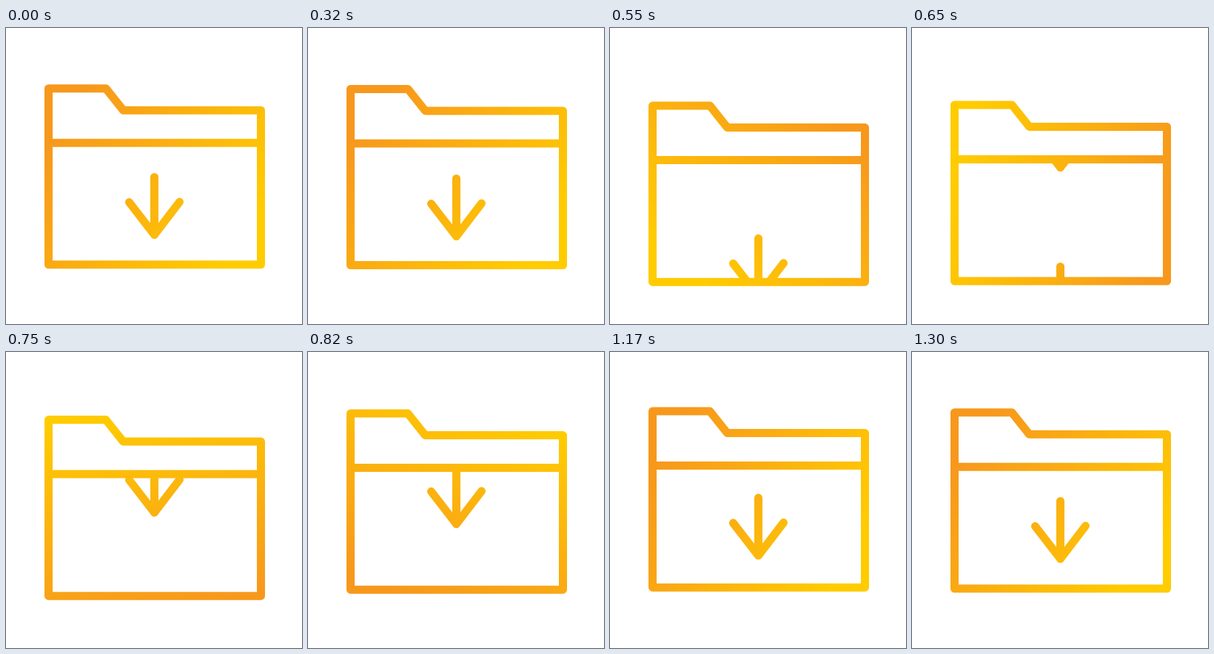
Write an HTML page with a canvas that moves like this. It is 400 by 400 pixels and loops after 1.32 s.

```html
<!DOCTYPE html>
<html lang="en">
<head>
<meta charset="utf-8">
<title>Folder download</title>
<style>
  html, body { margin: 0; height: 100%; overflow: hidden; background: #fff; }
  canvas { display: block; }
</style>
</head>
<body>
<canvas id="stage" width="400" height="400"></canvas>
<script>
const ctx = document.getElementById('stage').getContext('2d');
const LOOP = 1320, START = 320, END = 1300;
const TRAVEL = 212; // distance between the leaving and the entering arrow

// Motion curves as [time, value] points
const folderY = [[300, 0], [320, .7], [450, 17.5], [560, 23.6], [650, 22.2],
                 [820, 1.4], [940, -4.7], [1020, -4.5], [1300, 0]];
const arrowY = [[300, 0], [320, 2], [450, 43], [650, 121],
                [820, 165], [1020, 195], [1300, TRAVEL]];
const angle = [[300, 35], [320, 36], [450, 75], [650, 195],
               [820, 295], [1020, 368], [1300, 395]];

const folder = new Path2D('M57.5 81.7H135L158.5 111.2H344.5V319.8H57.5ZM57.5 155.2H344.5');

// Smooth cubic through the points, at rest at both ends
function curve(points, t) {
  const slope = i => {
    const a = points[i - 1], b = points[i + 1];
    return a && b ? (b[1] - a[1]) / (b[0] - a[0]) : 0;
  };
  let i = 0;
  while (i < points.length - 2 && t >= points[i + 1][0]) i++;
  const [t0, v0] = points[i], [t1, v1] = points[i + 1];
  const d = t1 - t0, u = (t - t0) / d, w = 1 - u;
  return w * w * ((1 + 2 * u) * v0 + u * d * slope(i)) +
         u * u * ((1 + 2 * w) * v1 - w * d * slope(i + 1));
}

function gradient(degrees) {
  const a = degrees * Math.PI / 180, dx = 145 * Math.cos(a), dy = 145 * Math.sin(a);
  const g = ctx.createLinearGradient(201 - dx, 200.7 - dy, 201 + dx, 200.7 + dy);
  g.addColorStop(0, '#f7981d');
  g.addColorStop(1, '#ffcc00');
  return g;
}

function arrow(y) {
  ctx.stroke(new Path2D(`M200.5 ${201.5 + y}v78M166.5 ${235.5 + y}l34 44l34 -44.5`));
}

function draw(t) {
  const y = curve(folderY, t), shift = curve(arrowY, t) - y;
  ctx.clearRect(0, 0, 400, 400);
  ctx.save();
  ctx.translate(0, y);
  ctx.lineWidth = 11;
  ctx.lineCap = ctx.lineJoin = 'round';
  ctx.strokeStyle = gradient(curve(angle, t));
  ctx.stroke(folder);
  ctx.beginPath();
  ctx.rect(57.5, 155.2, 287, 164.6);
  ctx.clip();
  arrow(shift);
  arrow(shift - TRAVEL);
  ctx.restore();
}

// Forty steps a second, alternating 20 and 30 ms
const snap = t => Math.floor(t / 50) * 50 + (t % 50 >= 20 ? 20 : 0);

function tick() {
  const t = snap(performance.now() % LOOP);
  draw(t < START ? END : Math.min(t, END));
  requestAnimationFrame(tick);
}
tick();
</script>
</body>
</html>
```
